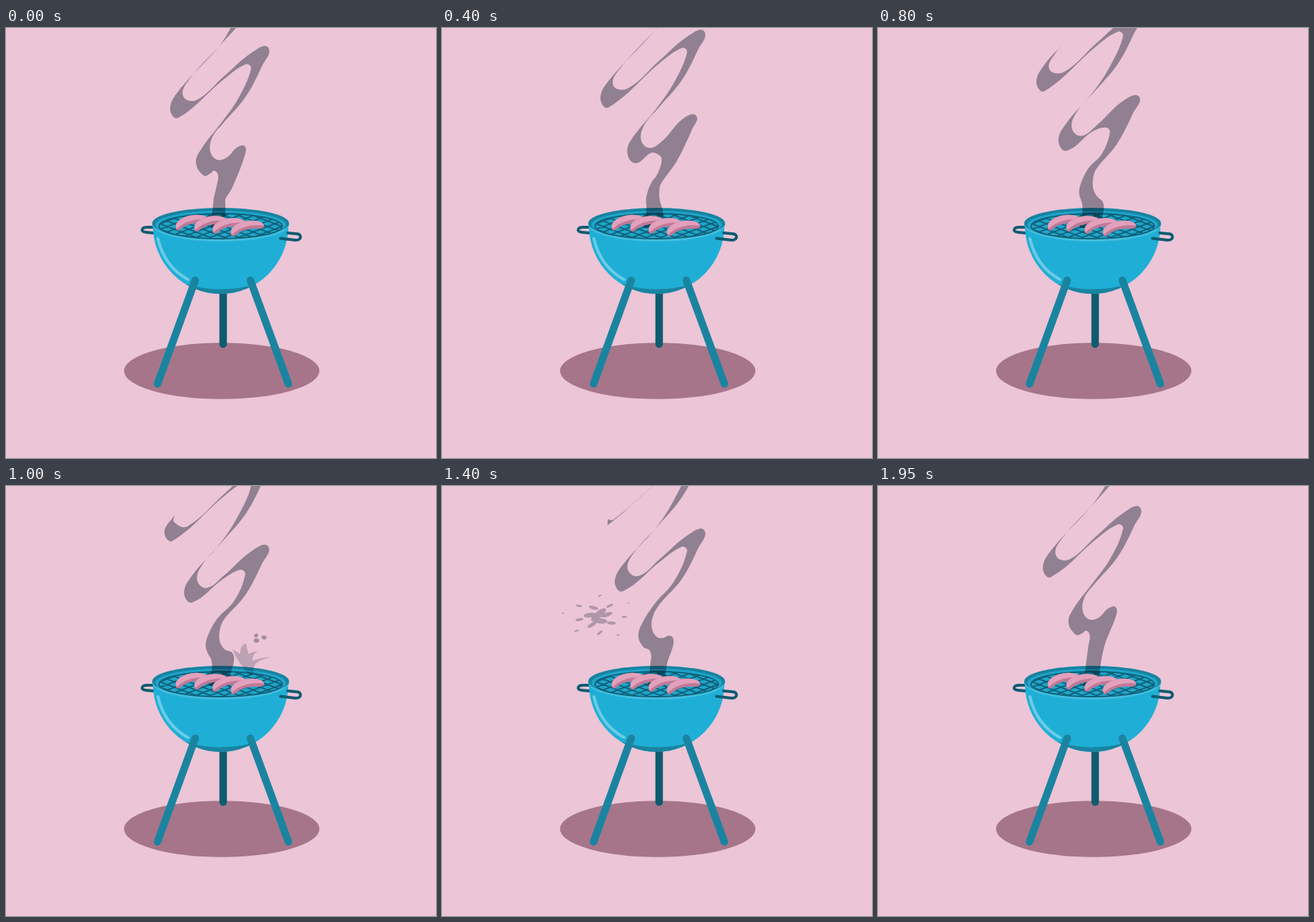
Recreate the animation shown at these times as an HTML page. Size 600 by 600 pixels, loop 2 s.

```html
<!DOCTYPE html>
<html lang="en">
<head>
<meta charset="utf-8">
<title>Smoking grill</title>
<style>
  html, body { margin: 0; height: 100%; overflow: hidden; background: #ecc5d7; }
  svg { display: block; width: 100vw; height: 100vh; }
  .smoke { fill: #9ca6ad; mix-blend-mode: multiply; }
</style>
</head>
<body>
<svg viewBox="0 0 600 600">
  <defs>
    <clipPath id="grate"><ellipse cx="299.5" cy="276.5" rx="86" ry="17.5"/></clipPath>
    <clipPath id="bowl"><path d="M205 276A94.500 95 0 0 0 394 276Z"/></clipPath>
    <g id="sausage">
      <path fill="#bf7a97" d="M237 280C234 270 248 262 262 261C273 260 283 263 283 268C283 273 276 272 268 272C256 273 250 276 246 279C242 283 239 284 237 280Z"/>
      <path fill="#e3a0bc" d="M237 276C237 269 249 262 262 261C273 260 283 263 283 268C270 265 249 269 239 280Q237 280 237 276Z"/>
    </g>
  </defs>

  <rect width="600" height="600" fill="#ecc5d7"/>
  <ellipse cx="301" cy="478.5" rx="136.3" ry="39.3" fill="#a6758a"/>
  <g fill="none" stroke="#0e5c70" stroke-linecap="round">
    <path stroke-width="10.500" d="M303 360V441"/>
    <path stroke-width="3.800" d="M206 286L195 285Q189 284 190 281Q191 278 197 278H206"/>
  </g>
  <g clip-path="url(#bowl)">
    <path fill="#1fafd6" d="M200 260H400V380H200Z"/>
    <path fill="#1a84a0" d="M250 357Q300 372 350 357V380H250Z"/>
  </g>
  <path fill="none" stroke="#6dcbe6" stroke-width="4" stroke-linecap="round" d="M212 294Q221 333 254 351"/>
  <path fill="none" stroke="#1a84a0" stroke-width="10.500" stroke-linecap="round" d="M264 352L211.500 496.500M341 352L394 496.500"/>

  <ellipse cx="299.500" cy="274.500" rx="95.500" ry="23.500" fill="#42bddf"/>
  <ellipse cx="299.500" cy="272.500" rx="95.500" ry="21.500" fill="#1883a0"/>
  <ellipse cx="299.500" cy="274.500" rx="91" ry="19.500" fill="#1fa5ca"/>
  <path id="mesh" clip-path="url(#grate)" fill="none" stroke="#0f6078" stroke-width="1.900"/>
  <ellipse cx="299.500" cy="276.500" rx="86" ry="17.500" fill="none" stroke="#0f6078" stroke-width="1.800"/>
  <path fill="none" stroke="#0e5c70" stroke-width="3.800" stroke-linecap="round" d="M383 293.500L404 296Q411 296 411 291Q410 287 404 287L393 286"/>

  <path id="smoke" class="smoke"/>
  <path id="spurtL" class="smoke"/><path id="bitsL" class="smoke"/>
  <path id="spurtR" class="smoke"/><path id="bitsR" class="smoke"/>
  <use href="#sausage"/>
  <use href="#sausage" x="26" y="1.500"/>
  <use href="#sausage" x="51.500" y="4.500"/>
  <use href="#sausage" x="77" y="8"/>
</svg>
<script>
const LOOP = 2000, GROWN = 1150, TURN = 2 * Math.PI;
const el = id => document.getElementById(id);
const clamp = x => Math.max(0, Math.min(1, x));
const mix = (a, b, k) => a + (b - a) * k;
const mixPoint = (a, b, k) => [mix(a[0], b[0], k), mix(a[1], b[1], k)];

// A wave of smoke bends right, then left. Each key point: young x, y, then grown x, y.
const lobe = [[316,222, 334,145], [333,178, 357,102], [333,165, 366,76], [322,167, 344,82]];
const valley = [[309,180, 304,116], [295,184, 278,136], [285,172, 264,125], [288,152, 272,103], [302,134, 302,69]];
const notch = [[294,220, 324,147], [296,206, 342,105], [291,199, 335,99]];
const bulge = [[285,203, 304,120], [276,206, 257,156], [265,188, 246,143], [273,168, 258,118], [299,134, 299,72]];

// Easing of x and y while growing: the lobe shoots out, the notch follows late.
const steady = k => [k, k];
const shoot = k => [1 - (1 - k) ** 2.5, k ** 0.7];
const lag = k => [k ** 1.4, k ** 1.4];

const baseRight = t => 309.5 - 3.5 * Math.cos(TURN * (t - 100) / LOOP);
const baseLeft = t => 284.5 - 3.7 * Math.sin(TURN * (t - 100) / LOOP);

// u: place along the wave, from 0 (low) to 1 (high)
function place([x0, y0, x1, y1], u, age, ease, seed) {
  if (age < 0) {
    const k = clamp(1 + age / LOOP) ** mix(2, 1, u);
    return mixPoint(mixPoint(seed[0], seed[1], u), [x0, y0], k);
  }
  const [kx, ky] = ease(clamp(age / GROWN));
  const lean = clamp((300 - x1) / 30) * Math.max(0, Math.min(age, 2400) - GROWN) / 1000;
  const rise = Math.max(0, age - GROWN) * 0.057;
  return [mix(x0, x1, kx) - 20 * lean, mix(y0, y1, ky) - rise + 21 * lean];
}

function edge(low, lowEase, high, age, seed) {
  const n = low.length + high.length - 1;
  return [...low, ...high].map((p, i) =>
    place(p, i / n, age, i < low.length ? lowEase : steady, seed));
}

// The old end gets thin and shrinks back along the bend.
function fade(a, b, age) {
  const end = 4 * (1 - clamp((age - 2600) / 1200)), thin = 0.93 * clamp((age - 2800) / 750);
  a = a.map((p, i) => mixPoint(p, b[i], thin));
  const i = Math.min(3, Math.floor(end));
  const at = list => mixPoint(list[i], list[i + 1], end - i);
  const tip = mixPoint(at(a), at(b), 0.5);
  return [a, b].map(list => list.map((p, j) => j > end ? tip : p));
}

function wave(age) {
  const t = age + LOOP;
  const right = edge(lobe, shoot, valley, age, [[baseRight(t), 276], [306, 239]]);
  const left = edge(notch, lag, bulge, age, [[baseLeft(t), 276], [290, 237]]);
  const [a, b] = fade(right.slice(4), left.slice(3), age);
  return [[...right.slice(0, 4), ...a], [...left.slice(0, 3), ...b]];
}

function smooth(pts) {
  const dir = pts.map((p, i) => {
    const a = pts[Math.max(0, i - 1)], b = pts[Math.min(pts.length - 1, i + 1)];
    const x = b[0] - a[0], y = b[1] - a[1], d = Math.hypot(x, y) || 1;
    return [x / d, y / d];
  });
  return pts.slice(1).reduce((d, b, i) => {
    const a = pts[i], [ax, ay] = dir[i], [bx, by] = dir[i + 1];
    const h = Math.hypot(b[0] - a[0], b[1] - a[1]) * 0.36;
    return d + 'C' + [a[0] + ax * h, a[1] + ay * h, b[0] - bx * h, b[1] - by * h, ...b];
  }, 'M' + pts[0]) + 'Z';
}

function drawSmoke(t) {
  const right = [[baseRight(t), 279]], left = [[baseLeft(t), 279]];
  for (const age of [t - LOOP, t, t + LOOP]) {
    const [r, l] = wave(age);
    right.push(...r);
    left.push(...l);
  }
  if (t < 600) {
    const [r, l] = wave(t + 2 * LOOP);
    right.push(r[0]);
    left.push(l[0]);
  }
  el('smoke').setAttribute('d', smooth([...right, ...left.reverse()]));
}

function ellipse(x, y, rx, ry, tilt) {
  const a = tilt * TURN / 360, dx = rx * Math.cos(a), dy = rx * Math.sin(a);
  const arc = `A${rx} ${ry} ${tilt} 1 1 `;
  return `M${x - dx} ${y - dy}${arc}${x + dx} ${y + dy}${arc}${x - dx} ${y - dy}Z`;
}

const wisp = ([x, y]) => `M239 264C240 250 ${mix(x, 250, 0.7)} ${y + 6} ${x} ${y}` +
  `C${mix(x, 262, 0.5)} ${y} 268 ${y + 14} 243 264Z`;
const spurt = [[216, 239], [234, 231], [250, 220], [271, 227]].map(wisp).join('');

const puffs = [
  {side: 'L', start: 1000, flip: 1, foot: 240, x: 217, y: 183, rx: 52, ry: 36,
    count: 17, core: 0.1, turn: 5, big: 13, small: 1.8, flat: 0.36, strength: 0.66},
  {side: 'R', start: 800, flip: -1, foot: 345, x: 384, y: 165, rx: 18, ry: 15,
    count: 3, core: 0.95, turn: 3.8, big: 6, small: 7.5, flat: 0.8, strength: 0.45}
];

// A puff shoots up, then bursts into bits on a spiral.
function drawPuff(p, t) {
  const age = t - p.start, grow = clamp(age / 150);
  const jet = el('spurt' + p.side), bits = el('bits' + p.side);
  jet.setAttribute('transform', `translate(${p.foot} 264) scale(${p.flip * grow} ${grow}) translate(-240 -264)`);
  jet.setAttribute('fill-opacity', age > 0 ? clamp((250 - age) / 100) : 0);
  const k = 1 - (1 - clamp((age - 150) / 250)) ** 2;
  const size = clamp((age - 150) / 100) * clamp((600 - age) / 200);
  let d = '';
  for (let i = 0; size > 0 && i < p.count; i++) {
    const u = i / (p.count - 1), far = mix(p.core, 1, u), a = p.turn + i * 2.4;
    const x = mix(p.foot + 8 * p.flip, p.x + p.rx * far * Math.cos(a), k);
    const y = mix(238, p.y + p.ry * far * Math.sin(a), k);
    const r = mix(p.big, p.small, Math.sqrt(u)) * size;
    d += ellipse(x, y, r, r * p.flat, i * 47 % 60 - 40);
  }
  bits.setAttribute('d', d);
  bits.setAttribute('fill-opacity', mix(1, p.strength, k));
}

let mesh = '';
for (let x = 130; x < 480; x += 20) mesh += `M${x} 256l110 42M${x} 298l110 -42`;
el('mesh').setAttribute('d', mesh);
for (const p of puffs) el('spurt' + p.side).setAttribute('d', spurt);

const begin = performance.now();
function frame() {
  const t = Math.floor((performance.now() - begin) % LOOP / 50) * 50;
  drawSmoke(t);
  for (const p of puffs) drawPuff(p, t);
  requestAnimationFrame(frame);
}
frame();
</script>
</body>
</html>
```
